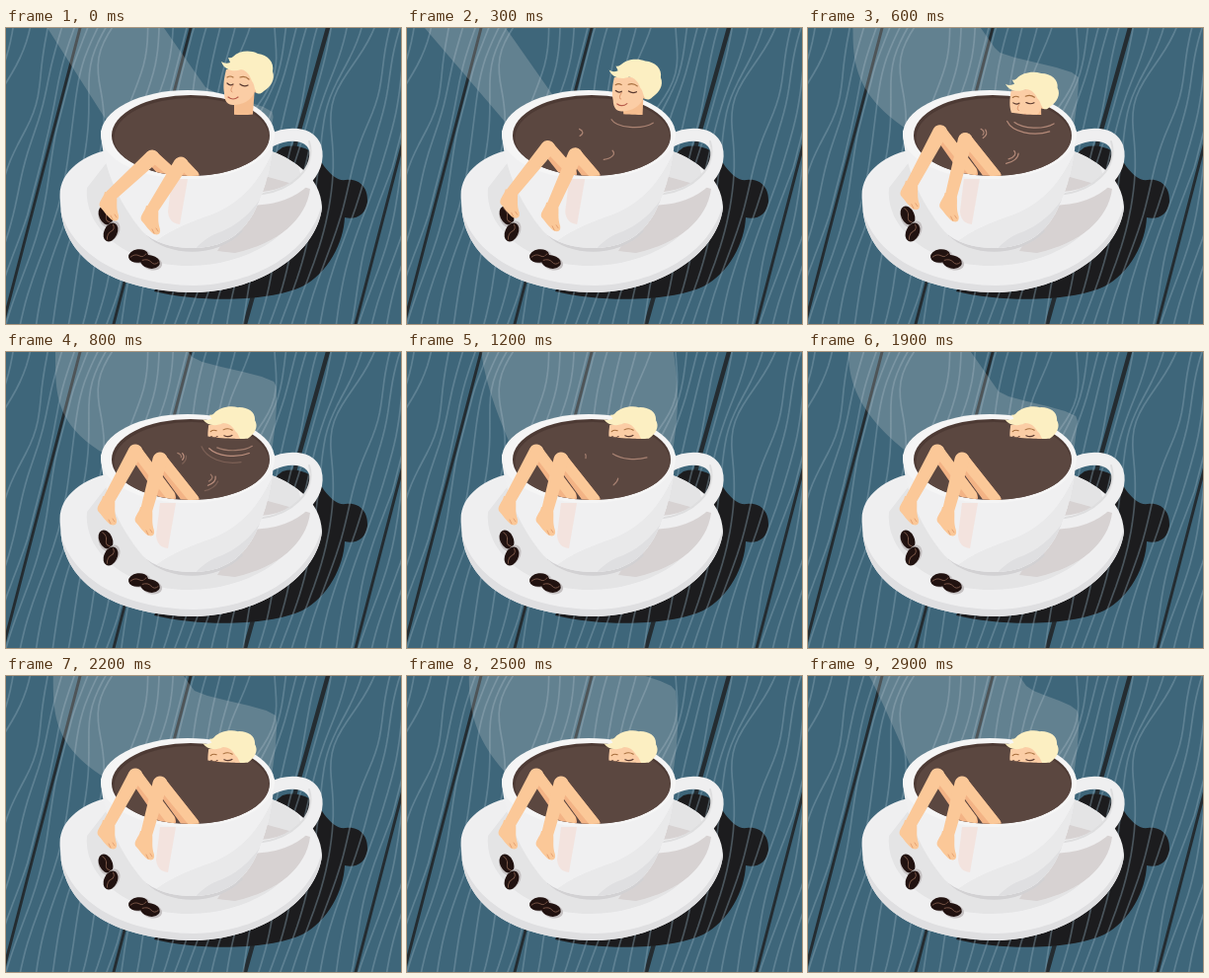
An HTML page for the animation above (3000 ms loop, 400 px wide and 300 px high).

```html
<!DOCTYPE html>
<html lang="en">
<head>
<meta charset="utf-8">
<title>Coffee bath</title>
<style>
html, body { margin: 0; width: 100%; height: 100%; overflow: hidden; background: #3e667a; }
svg { display: block; width: 100vw; height: 100vh; }
</style>
</head>
<body>
<svg viewBox="0 0 400 300" fill="none" stroke-linecap="round" stroke-linejoin="round">
  <defs>
    <clipPath id="surface"><ellipse cx="187" cy="109" rx="80" ry="41"/></clipPath>
    <clipPath id="dry"><path d="M180 0H300V80C268 86 253 88 240 88C224 88 210 87 180 82Z"/></clipPath>
    <clipPath id="dish"><path d="M55 175C51 148 76 128 110 122H262C290 132 319 150 320 182C314 232 250 268 190 268C106 267 55 232 55 175Z"/></clipPath>
    <clipPath id="body"><path id="bodyShape" d="M96 104C97 138 113 176 138 206C152 221 180 225 202 222C225 219 242 205 252 185C263 163 270 135 272 104Z"/></clipPath>
  </defs>

  <rect width="400" height="300" fill="#3e667a"/>
  <g transform="matrix(1 0 -.26 1 0 0)" stroke="#242c31">
    <path d="M75 -5V305M187 -5V305M432 -5V305" stroke-width="3"/>
    <path d="M326 -5L320 305" stroke-width="4.500"/>
  </g>
  <path d="M280 121C296 116 314 124 322 140C330 150 336 155 344 154C358 152 367 162 366 176C365 189 354 195 343 192C342 217 326 249 300 262C268 277 200 279 150 267L190 190Z" fill="#1c1c1e"/>
  <path id="grain" stroke="#8fabb9" stroke-width="1.700" opacity=".4"/>
  <path id="steam" fill="#d6d3d5" opacity=".24"/>

  <g clip-path="url(#dish)">
    <rect x="40" y="110" width="300" height="170" fill="#efeff0"/>
    <path d="M54 178C62 226 114 260 190 261C252 260 308 228 320 178L326 272H50Z" fill="#dfdfe1"/>
    <path d="M82 162C78 206 128 242 186 241C244 240 292 212 304 168L292 126H110Z" fill="#e4e4e5"/>
    <path d="M232 228C276 218 304 194 308 163L262 150L214 226Z" fill="#d7d2d2"/>
    <path d="M142 210C164 232 214 234 240 206L230 190Z" fill="#d2d1d3"/>
  </g>

  <path d="M268 114C286 105 307 106 313 121C320 145 294 171 254 173" stroke="#efeff0" stroke-width="13"/>
  <path d="M307 115C315 143 288 164 260 168" stroke="#dededf" stroke-width="2"/>
  <use href="#bodyShape" fill="#f0f0f1"/>
  <g clip-path="url(#body)">
    <path d="M276 110C262 150 240 180 200 192C178 200 162 208 152 216L190 230L260 215Z" fill="#e9e9ea"/>
    <path d="M276 140C262 170 247 194 219 206C207 210 198 216 190 226L250 220Z" fill="#dfdfe1"/>
  </g>
  <ellipse cx="184" cy="108" rx="88" ry="45" fill="#f5f5f5"/>
  <ellipse cx="187" cy="109" rx="80" ry="41" fill="#4d3a34"/>
  <g clip-path="url(#surface)">
    <ellipse cx="188" cy="111" rx="78.500" ry="40" fill="#5b4740"/>
    <g id="rings" stroke="#c99a86" stroke-width="1.200"></g>
  </g>

  <g clip-path="url(#dry)">
    <g id="head">
      <path d="M231 70V100H249L252 60Z" fill="#f5bd8f"/>
      <ellipse cx="254" cy="61" rx="3.500" ry="5" fill="#f5bd8f"/>
      <path d="M223 42C220 54 220 60 221 66C221 74 224 78 230 78C240 78 249 73 252 64L254 42Z" fill="#fbcda5"/>
      <path d="M218 34Q222 37 227 35L225 30Q228 31 230 29C236 23 247 22 255 26C265 27 272 35 270 44C273 52 268 60 261 64C258 67 256 67 254 66C251 62 252 57 249 54C247 48 244 43 238 42C231 45 221 43 218 34Z" fill="#fcefc2"/>
      <path d="M224 50Q227 48 230 50M237 50Q242 48 246 52" stroke="#a8703f" stroke-width="1.200"/>
      <path d="M224 56Q227 59 230 57M237 57Q241 60 245 58" stroke="#59392f" stroke-width="1.300"/>
      <path d="M230 58Q226 64 229 65" stroke="#df9b72"/>
      <path d="M225 70Q230 74 235 70" stroke="#b75c4b" stroke-width="1.200"/>
    </g>
  </g>

  <g id="beans"></g>
  <path id="glow" fill="#f3ddd6" opacity=".7"/>
  <g id="legs"></g>
</svg>
<script>
const $ = id => document.getElementById(id);
const add = (parent, tag, attrs) => {
  const el = document.createElementNS('http://www.w3.org/2000/svg', tag);
  for (const k in attrs) el.setAttribute(k, attrs[k]);
  return parent.appendChild(el);
};
const clamp = v => Math.max(0, Math.min(1, v));
const smooth = v => (v = clamp(v)) * v * (3 - 2 * v);
const lerp = (a, b, p) => a + (b - a) * p;

let seed = 7;
const random = () => (seed = seed * 16807 % 2147483647) / 2147483647;

// Grain lines follow the plank and bend around one knot each
function drawGrain() {
  const seams = [0, 75, 187, 324, 432, 500];
  let d = '';
  for (let n = 0; n < 5; n++) {
    const l = seams[n], w = seams[n + 1] - l, count = Math.round(w / 14);
    const knot = w * lerp(0.4, 0.6, random()), ky = lerp(10, 90, random());
    for (let i = 0; i < count; i++) {
      const u = (i + 0.5) * w / count, off = u - knot;
      for (let y = -10; y <= 310; y += 8) {
        const push = Math.sign(off) * 20 * Math.exp(-(((y - ky) / 48) ** 2) - Math.abs(off) / 28);
        const wave = 4 * Math.sin(y / 34 + n * 2 + i * 0.7);
        const x = l + Math.max(3, Math.min(w - 4, u + push + wave)) - 0.26 * y;
        d += `${y < 0 ? 'M' : 'L'}${x.toFixed(1)} ${y}`;
      }
    }
  }
  $('grain').setAttribute('d', d);
}

function drawBeans() {
  for (const [x, y, turn] of [[101, 190, 65], [106, 207, -65], [134, 231, -8], [146, 237, 12]]) {
    const g = add($('beans'), 'g', { transform: `translate(${x} ${y}) rotate(${turn})` });
    add(g, 'ellipse', { cx: 2, cy: 1, rx: 10.5, ry: 7, fill: '#c5c1c2' });
    add(g, 'ellipse', { rx: 10, ry: 6.7, fill: '#211210' });
    add(g, 'path', { d: 'M-8 0Q-3 -3 1 0T8 -1', stroke: '#7a5647', 'stroke-width': 0.9 });
  }
}

// Thigh end stays in the coffee; knee and ankle travel from one point to another
const legs = [
  { hip: [164, 147], knee: [148, 131, 131, 101], ankle: [106, 170, 104, 150] },
  { hip: [188, 151], knee: [177, 138, 156, 109], ankle: [148, 184, 142, 161] }
];
for (const leg of legs) {
  const wet = add($('legs'), 'g', { 'clip-path': 'url(#surface)' });
  leg.thigh = add(wet, 'path', { fill: '#f3b385' });
  leg.light = add(wet, 'path', { fill: '#fbc898' });
  leg.shin = add($('legs'), 'path', { fill: '#fbc898' });
  leg.toes = add($('legs'), 'path', { stroke: '#e5a274' });
}

function limb(x1, y1, r1, x2, y2, r2) {
  const d = Math.hypot(x2 - x1, y2 - y1), nx = -(y2 - y1) / d, ny = (x2 - x1) / d;
  return `M${x1 + nx * r1} ${y1 + ny * r1}L${x2 + nx * r2} ${y2 + ny * r2}` +
    `A${r2} ${r2} 0 0 0 ${x2 - nx * r2} ${y2 - ny * r2}L${x1 - nx * r1} ${y1 - ny * r1}A${r1} ${r1} 0 0 0 ${x1 + nx * r1} ${y1 + ny * r1}Z`;
}

function drawBather(t) {
  const p = clamp(t / 800), bend = smooth(p), lift = p * p, sink = p ** 1.4;
  for (const { hip: [wx, wy], knee, ankle, thigh, light, shin, toes } of legs) {
    const kx = lerp(knee[0], knee[2], bend), ky = lerp(knee[1], knee[3], bend);
    const ax = lerp(ankle[0], ankle[2], lift), ay = lerp(ankle[1], ankle[3], lift);
    thigh.setAttribute('d', limb(wx, wy, 8, kx, ky, 7));
    light.setAttribute('d', limb(wx + 2, wy - 2, 5, kx + 1, ky - 1, 5.5));
    shin.setAttribute('d', limb(kx, ky, 7.5, ax, ay, 6));
    shin.setAttribute('d', shin.getAttribute('d') +
      `M${ax - 6} ${ay - 4}c-1 6 -7 10 -5 15c4 4 8 11 13 14q7 2 6 -5c-3 -8 -1 -14 -2 -22Z`);
    toes.setAttribute('d', `M${ax + 2} ${ay + 24}l-2 -4M${ax + 6} ${ay + 22}l-2 -3`);
  }
  const gx = 168 - 12 * bend;
  $('glow').setAttribute('d', `M${gx} 153H${gx + 16}L${gx + 8} 199Q${gx - 3} 198 ${gx - 4} 186Z`);
  const hx = -17 * (1 - (1 - p) ** 3);
  $('head').setAttribute('transform',
    `translate(${243 + hx} ${50 + 28 * sink}) rotate(${-8 * sink}) scale(1 ${1 - 0.15 * sink}) translate(-243 -50)`);
}

// Rings spread from the neck, the shins and the knees
const rings = [];
for (const [cx, cy, size, from, to] of [[230, 90, 20, 20, 165], [194, 127, 13, -40, 70], [166, 106, 10, -60, 40]])
  for (let i = 0; i < 3; i++)
    rings.push({ cx, cy, size, from, to: to - i * 15, start: 100 + i * 270, el: add($('rings'), 'path', {}) });

function drawRings(t) {
  for (const { cx, cy, size, from, to, start, el } of rings) {
    const p = clamp((t - start) / 750), rx = size * (1 + 0.7 * p), ry = rx * lerp(0.35, 0.7, p);
    const at = deg => {
      const q = deg * Math.PI / 180;
      return `${cx + rx * Math.cos(q)} ${cy + ry * Math.sin(q)}`;
    };
    el.setAttribute('d', `M${at(from + 60 * p)}A${rx} ${ry} 0 0 1 ${at(to)}`);
    el.setAttribute('opacity', 0.9 * Math.sin(Math.PI * p) ** 0.7);
  }
}

// Steam: time, left at top, curl of left side, right at top, height of the rising shoulder
const puffs = [[0, 42, 1, 160, 60], [300, 18, 1, 100, 95], [400, 41, 2.2, 165, 40], [800, 50, 3.5, 185, 5], [1300, 82, 0.9, 268, -40]];
puffs.push([1500, ...puffs[0].slice(1)]);

function drawSteam(t) {
  const ph = t % 1500, i = puffs.findIndex(k => k[0] > ph), a = puffs[i - 1], b = puffs[i];
  const [, left, curl, right, rise] = a.map((v, n) => lerp(v, b[n], (ph - a[0]) / (b[0] - a[0])));
  const west = [], east = [];
  for (let y = 0; y <= 110; y += 5) {
    west.push([lerp(left, 112, (y / 110) ** curl), y]);
    const bulge = 270 + 4 * Math.sin(y / 30);
    east.unshift([lerp(Math.min(right + 0.7 * y, bulge), bulge, smooth((y - rise) / 28)), y]);
  }
  $('steam').setAttribute('d', 'M' + west.concat(east).map(q => q.join(' ')).join('L') + 'Z');
}

function draw(now) {
  const t = Math.floor(now % 3000 / 100) * 100;
  drawBather(t);
  drawRings(t);
  drawSteam(t);
}

let begin;
function tick(now) {
  begin ??= now;
  draw(now - begin);
  requestAnimationFrame(tick);
}
drawGrain();
drawBeans();
draw(0);
requestAnimationFrame(tick);
</script>
</body>
</html>
```
